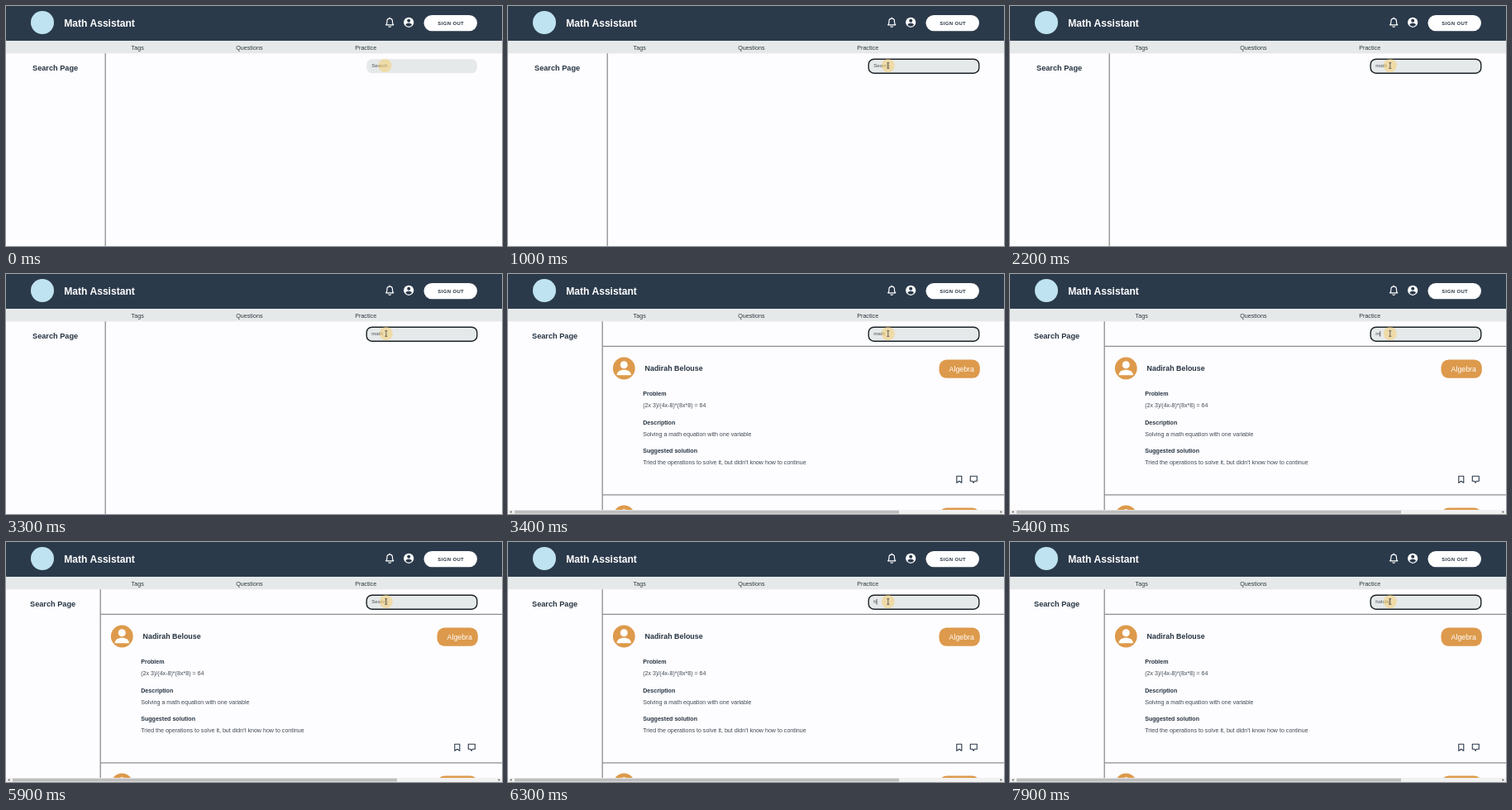
Write an HTML page that moves like this. It is 600 by 290 pixels and loops after 8000 ms.

```html
<!DOCTYPE html>
<html lang="en">
<head>
<meta charset="utf-8">
<title>Math Assistant</title>
<style>
  html, body { margin: 0; width: 100%; height: 100%; overflow: hidden; background: #fdfcfe; }
  svg { display: block; width: 600px; height: 290px; }
  text { font: 7.1px Arial, "Liberation Sans", sans-serif; fill: #414a54; }
  .b { font-weight: 700; fill: #263442; }
  .brand { font-size: 12.1px; fill: #fff; }
  .heading { font-size: 9.2px; }
  .name { font-size: 8.9px; }
  .button { font-size: 6px; letter-spacing: .35px; }
  .tag { font-size: 8.8px; fill: #fff; }
  .nav text { font-size: 7.2px; fill: #2f3841; }
  #query { font-size: 6.2px; fill: #4b535b; }
  .line { stroke: #8d8d92; stroke-width: 1.3; fill: none; }
  .icon { fill: none; stroke: #2b3a4b; stroke-width: 1.1; stroke-linejoin: round; }
</style>
</head>
<body>
<svg viewBox="0 0 600 290">
  <defs>
    <g id="cardTop">
      <circle cx="140.3" cy="114" r="13.4" fill="#dd9a4c"/>
      <circle cx="140.3" cy="109.8" r="4.5" fill="#fff"/>
      <path d="M131.6 122.3c0-8.6 17.4-8.6 17.4 0z" fill="#fff"/>
      <rect x="521.5" y="103.5" width="49.3" height="22.3" rx="9" fill="#dd9a4c"/>
    </g>
  </defs>
  <rect width="600" height="290" fill="#fdfcfe"/>
  <rect width="600" height="42" fill="#2b3a4b"/>
  <circle cx="44" cy="20" r="14" fill="#bfe3f0"/>
  <text class="b brand" x="70.3" y="24.7">Math Assistant</text>

  <path d="M459.7 22.8c1.4-1.3 1.2-2.3 1.2-4.3 0-4.6 6.6-4.6 6.6 0 0 2-.2 3 1.2 4.3z" fill="none" stroke="#fff" stroke-width="1.2" stroke-linejoin="round"/>
  <path d="M464.2 13.8v1.2M462.7 24.4a1.6 1.6 0 0 0 3 0" fill="none" stroke="#fff" stroke-width="1.2"/>
  <circle cx="487.2" cy="19.8" r="6.1" fill="#fff"/>
  <circle cx="487.2" cy="17.7" r="2" fill="#2b3a4b"/>
  <path d="M483.4 22.8c1-2.6 6.6-2.6 7.6 0-2 2.6-5.6 2.6-7.6 0z" fill="#2b3a4b"/>
  <rect x="505.5" y="11" width="64.5" height="19.2" rx="9.6" fill="#fff"/>
  <text class="b button" x="522.3" y="22.8">SIGN OUT</text>

  <rect y="42" width="600" height="15.3" fill="#e6e9e9"/>
  <g class="nav">
    <text x="151.6" y="52.5">Tags</text>
    <text x="278.2" y="52.5">Questions</text>
    <text x="422.2" y="52.5">Practice</text>
  </g>

  <g id="empty">
    <text class="b heading" x="32" y="77.8">Search Page</text>
    <path class="line" d="M120.2 57.3V290"/>
  </g>

  <g id="results">
    <text class="b heading" x="29" y="77.8">Search Page</text>
    <path class="line" d="M114.2 57.3V285M114.2 87.3H600M114.2 266.8H600"/>
    <use href="#cardTop"/>
    <use href="#cardTop" y="179"/>
    <text class="b name" x="165.6" y="117.4">Nadirah Belouse</text>
    <text class="tag" x="533.6" y="117.6">Algebra</text>
    <text class="b" x="163.2" y="147">Problem</text>
    <text x="163.2" y="161.4">(2x 3)/(4x-8)*(8x*8) = 64</text>
    <text class="b" x="163.2" y="181.6">Description</text>
    <text x="163.2" y="195.6">Solving a math equation with one variable</text>
    <text class="b" x="163.2" y="215.7">Suggested solution</text>
    <text x="163.2" y="229.8">Tried the operations to solve it, but didn't know how to continue</text>
    <path class="icon" d="M542.8 244.3h6v8l-3-2-3 2z"/>
    <path class="icon" d="M559.3 244.3h8v6h-3l-1.2 2-1.2-2h-2.6z"/>
    <rect y="285" width="600" height="5" fill="#f1f1f1"/>
    <rect x="8" y="285.7" width="465" height="3.8" fill="#bdbdbf"/>
    <path d="M2.2 287.6l2.2-1.5v3zM597.8 287.6l-2.2-1.5v3z" fill="#555"/>
  </g>

  <rect id="box" x="436.2" y="64.2" width="133.6" height="17" rx="6.5" fill="#e6e9e9"/>
  <text id="query" x="442.2" y="74.3"></text>
  <path id="caret" d="M0 69v6.6" stroke="#222" stroke-width=".7"/>
  <g id="pointer">
    <circle cy="72" r="8" fill="#f6cf72" opacity=".55"/>
    <path id="beam" d="M-1.5 68.7H1.5M0 68.7v6.6M-1.5 75.3H1.5" fill="none" stroke="#444" stroke-width=".8"/>
  </g>
</svg>
<script>
  const LOOP = 8000, FOCUS = 300, SEARCH = 3400;
  const $ = id => document.getElementById(id);

  // [start ms, input value]
  const typed = [
    [0, ""], [1500, "ma"], [1600, "math"], [5400, "m"], [5500, ""],
    [6300, "h"], [6400, "ho"], [6500, "holo"], [6600, "holola"]
  ];
  // the caret flips at each of these times, starting hidden
  const blinks = [1600, 2200, 2700, 3300, 3800, 4300, 4800, 5900, 6300, 7100, 7500];
  const advance = { m: .833, a: .556, t: .278, h: .556, o: .556, l: .222 };

  const show = (id, on) => $(id).setAttribute("visibility", on ? "visible" : "hidden");

  function draw(t) {
    const value = typed.filter(k => k[0] <= t).pop()[1];
    const focused = t >= FOCUS;
    const move = Math.min(1, Math.max(0, (t - 200) / 800));
    const width = [...value].reduce((sum, c) => sum + advance[c] * 6.2, 0);

    show("empty", t < SEARCH);
    show("results", t >= SEARCH);
    $("box").setAttribute("stroke", focused ? "#1b2229" : "none");
    $("box").setAttribute("stroke-width", 1.4);
    $("query").textContent = value || "Search";
    $("caret").setAttribute("transform", `translate(${442.6 + width} 0)`);
    show("caret", blinks.filter(b => b <= t).length % 2);
    $("pointer").setAttribute("transform", `translate(${458.4 + 1.4 * move} 0)`);
    show("beam", focused);
  }

  const start = performance.now();
  function tick() {
    draw((performance.now() - start) % LOOP);
    requestAnimationFrame(tick);
  }
  tick();
</script>
</body>
</html>
```
